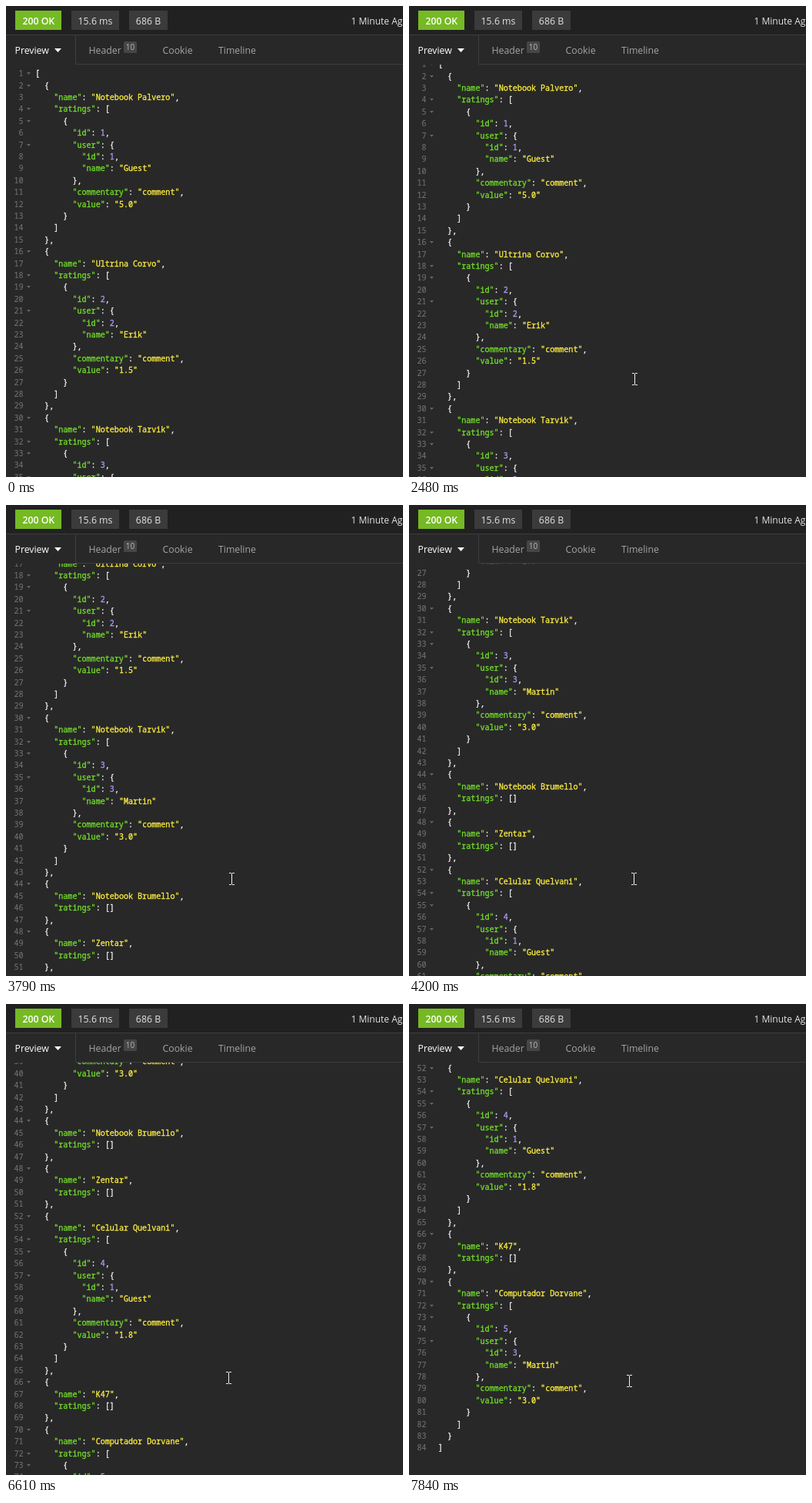
Write an HTML page that moves like this. It is 516 by 611 pixels and loops after 8 s.

```html
<!DOCTYPE html>
<html lang="en">
<head>
<meta charset="utf-8">
<title>JSON response</title>
<style>
  html, body { margin: 0; width: 100%; height: 100%; overflow: hidden; background: #282828; }
  svg { display: block; width: 516px; height: 611px; }
  text { white-space: pre; }
  .ui { font: 12.3px "Open Sans", "Noto Sans", sans-serif; fill: #a4a4a4; }
  .ui .on { fill: #ffffff; }
  .ui .chip { fill: #e4e4e4; }
  .mid { text-anchor: middle; }
  .bold { font-weight: 600; }
  .count { font-size: 10px; fill: #b8b8b8; }
  .age { font-size: 12px; }
  .code { font: 500 10.08px "Noto Sans Mono", "DejaVu Sans Mono", monospace; }
  .code text { fill: currentColor; stroke: currentColor; stroke-width: .3px; color: #f6f6f6; }
  .code tspan { fill: currentColor; stroke: currentColor; }
  .code .key { color: #74e02a; }
  .code .str { color: #fff040; }
  .code .num { color: #a79df0; }
  .code .line { color: #717171; font-weight: 400; text-anchor: end; stroke-width: .1px; }
  .fold { fill: #646464; }
</style>
</head>
<body>
<svg viewBox="0 0 516 611">
  <defs><clipPath id="pane"><rect y="76" width="516" height="535"/></clipPath></defs>
  <rect width="516" height="611" fill="#282828"/>
  <g clip-path="url(#pane)"><g id="code" class="code"></g></g>

  <g class="ui">
    <rect width="516" height="37" fill="#212121"/>
    <path d="M0 37.5H516M90.5 37V75.5H516" fill="none" stroke="#3d3d3d"/>
    <rect x="12" y="6" width="60" height="25" fill="#75ba24"/>
    <rect x="85" y="6" width="62" height="25" fill="#3b3b3b"/>
    <rect x="160" y="6" width="50" height="25" fill="#3b3b3b"/>
    <text class="on mid bold" x="42.3" y="23.5">200 OK</text>
    <text class="chip mid" x="116" y="23.5">15.6 ms</text>
    <text class="chip mid" x="185" y="23.5">686 B</text>
    <text class="chip age" x="448.5" y="23.5">1 Minute Ago</text>
    <text class="on" x="11.5" y="62">Preview</text>
    <path class="on" d="M63 55h9l-4.500 5z"/>
    <text x="107.500" y="62">Header</text>
    <rect x="153" y="46" width="17" height="15" rx="1.500" fill="#464646"/>
    <text class="count mid" x="161.500" y="57">10</text>
    <text x="203.500" y="62">Cookie</text>
    <text x="276" y="62">Timeline</text>
  </g>

  <path id="beam" d="M-3.500-7.500h3m1 0h3M0-7V7M-3.500 7.500h3m1 0h3" fill="none" stroke="#f4f4f4"/>
</svg>
<script>
  const LOOP = 8000, STEP = 70, TICK = 100, MAX_SCROLL = 790;
  const LINE = 15.4, CHAR = 6.05, LEFT = 38, BASE = 91.2;

  const product = (name, id, userId, user, value) => ({
    name,
    ratings: id ? [{ id, user: { id: userId, name: user }, commentary: "comment", value }] : []
  });
  const data = [
    product("Notebook Palvero", 1, 1, "Guest", "5.0"),
    product("Ultrina Corvo", 2, 2, "Erik", "1.5"),
    product("Notebook Tarvik", 3, 3, "Martin", "3.0"),
    product("Notebook Brumello"),
    product("Zentar"),
    product("Celular Quelvani", 4, 1, "Guest", "1.8"),
    product("K47"),
    product("Computador Dorvane", 5, 3, "Martin", "3.0")
  ];

  const paint = s => s.replace(/("[^"]*")(:?)|\b\d+\b/g, (m, text, colon = "") => {
    const kind = !text ? "num" : colon ? "key" : "str";
    return `<tspan class="${kind}">${text || m}</tspan>${colon}`;
  });

  const code = document.getElementById("code");
  code.innerHTML = JSON.stringify(data, null, 2).split("\n").map((row, i) => {
    const y = Math.round(BASE + i * LINE);
    const body = row.trimStart();
    const x = LEFT + (row.length - body.length) * CHAR;
    const fold = /[{[]$/.test(row) ? `<path class="fold" d="M27 ${y - 5}h5l-2.500 3z"/>` : "";
    return `<text class="line" x="22.5" y="${y}">${i + 1}</text>${fold}` +
      `<text x="${x}" y="${y}">${paint(body)}</text>`;
  }).join("");

  // wheel ticks: time of first visible step, progress already made by then
  const ticks = [
    [2480, .225], [3450, .128], [3720, .2], [3990, .2],
    [5940, .27], [6470, .21], [7220, .2], [7700, .21]
  ];
  const ease = p => .5 - .5 * Math.cos(Math.PI * Math.min(p, 1));
  const steps = (t, start) => Math.floor((t - start) / STEP + .001);

  function scrollAt(t) {
    const sum = ticks.reduce((s, [start, p]) =>
      t < start ? s : s + TICK * ease(p + .35 * steps(t, start)), 0);
    return Math.min(MAX_SCROLL, Math.round(sum));
  }

  const drift = [
    [3450, 293, 485], [3990, 292, 485], [5940, 291, 485], [6540, 290, 485],
    [6610, 289, 485], [6680, 288, 486], [6750, 287, 488], [6950, 286, 489]
  ];

  function pointerAt(t) {
    if (t < 1010) return null;
    const last = drift.filter(d => d[0] <= t).pop();
    if (last) return last.slice(1);
    const left = (1 - Math.min(steps(t, 1010) / 7, 1)) ** 2;
    return [Math.round(293 + 49 * left), Math.round(484 + 105 * left)];
  }

  const beam = document.getElementById("beam");
  function draw(t) {
    code.setAttribute("transform", `translate(0 ${-scrollAt(t)})`);
    const at = pointerAt(t);
    beam.setAttribute("visibility", at ? "visible" : "hidden");
    if (at) beam.setAttribute("transform", `translate(${at[0] + .5} ${at[1]})`);
  }

  const begin = performance.now();
  function frame() {
    draw((performance.now() - begin) % LOOP);
    requestAnimationFrame(frame);
  }
  frame();
</script>
</body>
</html>
```
